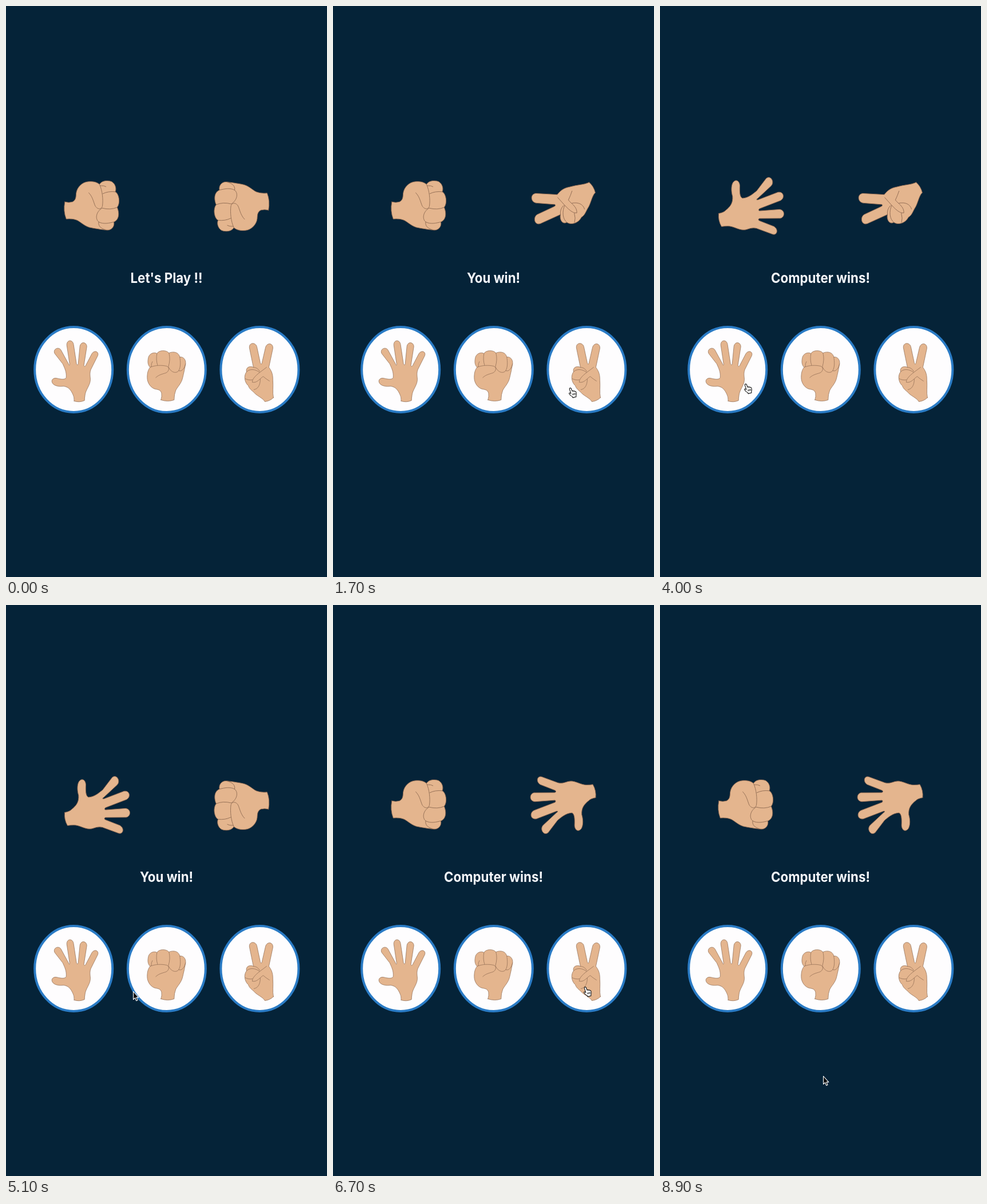
Animation, 561 px wide and 998 px high, one loop 9200 ms. Source, as an HTML page:

```html
<!DOCTYPE html>
<html lang="en">
<head>
<meta charset="utf-8">
<title>Rock paper scissors</title>
<style>
  html, body { margin: 0; width: 100%; height: 100%; overflow: hidden; background: #052338; }
  svg { display: block; }
  .hand { fill: #e4b58e; stroke: #8c6850; stroke-width: .7; stroke-linejoin: round; stroke-linecap: round; }
  .line { fill: none; }
  .ring { fill: #fefdfe; stroke: #2a7bc5; stroke-width: 4; }
  text { font: 700 22.3px Poppins, Inter, sans-serif; fill: #f4f6fa; text-anchor: middle; }
  #cursor path { fill: #fff; stroke: #111; stroke-width: 1.1; stroke-linejoin: round; }
  #cursor #arrow { fill: #0a0a0a; stroke: #fff; }
</style>
</head>
<body>
<svg width="561" height="998" viewBox="0 0 561 998">
  <defs>
    <g id="paper" class="hand">
      <path d="M1 55Q1 47-1 44C-5 35-9 30-18 29C-24 30-32 29-36 25C-41 19-36 14-30 15C-22 17-15 18-13 14C-12 4-16-3-19-10L-33-28C-37-36-26-41-22-34L-9-10C-8-7-7-7-7-10L-12-43C-12-53-1-53 0-43L5-10C5.5-8 8-8 8-10L11-41C13-50 23-48 23-40L18-8C18-5 20-5 21-7L32-28C37-35 45-31 42-24L30 0C27 8 30 14 29 20C28 28 21 36 20 44Q19 50 19 54Q10 58 1 55Z"/>
    </g>
    <g id="rock" class="hand">
      <path d="M-10 53Q-8 47-9 41C-11 35-15 35-20 34C-28 32-34 23-34 14C-34 7-33 1-29-4C-34-9-33-16-32-21C-30-29-21-31-17-28C-14-34-1-35 4-29C8-31 20-33 23-22C30-23 34-16 33-10C32-4 30 6 28 14C26 24 19 30 16 36Q13 43 13 53Q2 57-10 53Z"/>
      <path class="line" d="M-29-4C-20-8-8-8 0-6C6-4 4 4-2 6C-8 8-14 9-19 14M-17-28Q-19-17-16-8M4-29Q7-18 3-5C8 6 17 7 21 2C25-5 24-14 23-22M21 2C27 4 31-2 33-10M-27-5Q-27-11-25-14"/>
    </g>
    <g id="scissors" class="hand">
      <path d="M24 49Q18 55 9 56C6 50-5 46-10 40C-14 36-18 34-20 28C-27 22-28 10-23 4C-25-4-17-7-11-4L-18-38C-19-48-7-48-5-40L1-12C2-8 4-10 4-12L10-38C12-48 24-47 23-37L16-4C22 4 23 10 23 18C24 30 22 40 24 49Z"/>
      <path class="line" d="M12-4L0 5C-9 12-13 17-13 22C-5 24 0 16 6 12Q12 17 17 20M-23 4C-18-2-7-1 0 5M-11-4Q-4-4 0 3M-25 16Q-20 19-13 18M-10 35C-3 34 1 27 1 17"/>
    </g>
  </defs>
  <rect width="561" height="998" fill="#052338"/>
  <use id="left"/>
  <use id="right"/>
  <text id="label" transform="translate(280.5 483.5) scale(1 1.09)"></text>
  <g id="buttons"></g>
  <g id="cursor">
    <path id="arrow" d="M.5.5V14.5L3.6 11.7L5.7 16.8L8 15.8L5.9 10.9H9.8Z"/>
    <g id="pointer">
      <path d="M1.2 2.2C1.6.2 3.8.1 4.5 2L6.1 6.2Q7.3 5 8.4 6.3Q9.8 5.2 10.8 6.8Q12.6 6.2 13 8.4C13.8 11 13.3 13 12.7 14.5L13 16L7.1 17.6L6.4 15.8C3.9 15 2.2 13 .8 10.7C.2 9.4 1.7 8.7 2.8 9.7L3.8 10.4Z"/>
      <path d="M6.8 10.5L7.5 13.2M8.9 10L9.6 12.7M10.9 9.6L11.6 12.2"/>
    </g>
  </g>
</svg>
<script>
const $ = id => document.getElementById(id);
const LOOP = 9200, STEP = 100;
const WIN = "You win!", LOSE = "Computer wins!", TIE = "It's a tie!";

const rounds = [
  [0, "rock", "rock", "Let's Play !!"],
  [900, "rock", "scissors", WIN],
  [1900, "scissors", "scissors", TIE],
  [3500, "paper", "scissors", LOSE],
  [4400, "paper", "rock", WIN],
  [5400, "rock", "paper", LOSE],
  [6800, "scissors", "scissors", TIE],
  [7900, "rock", "paper", LOSE]
];

// time, x, y
const path = [
  [100, 285, 745], [600, 285, 670], [1000, 285, 670], [1600, 412, 667],
  [2300, 412, 667], [2800, 284, 668], [3300, 147, 660], [4700, 147, 660],
  [5100, 222, 675], [5400, 280, 668], [5900, 280, 668], [6600, 438, 667],
  [6900, 438, 667], [7500, 285, 666], [8200, 285, 666], [8900, 285, 823]
];

const buttons = { paper: 118.2, rock: 280.8, scissors: 443.4 };
const BUTTON_Y = 635.5;
for (const [name, x] of Object.entries(buttons))
  $("buttons").innerHTML += `<g transform="translate(${x} ${BUTTON_Y})">
    <ellipse class="ring" rx="68" ry="74.5"/><use href="#${name}"/></g>`;

const tilt = { paper: 80, rock: 85, scissors: 80 };

function showHand(id, name, flip = "") {
  $(id).setAttribute("href", "#" + name);
  $(id).setAttribute("transform",
    `${flip} translate(162 349.8) scale(1 1.09) rotate(${tilt[name]}) scale(1.2) scale(1 .917)`);
}

function cursorAt(t) {
  const i = path.findIndex(p => p[0] >= t);
  if (i < 0) return path.at(-1).slice(1);
  if (i === 0) return path[0].slice(1);
  const [t0, x0, y0] = path[i - 1], [t1, x1, y1] = path[i];
  const u = (t - t0) / (t1 - t0);
  return [x0 + (x1 - x0) * u, y0 + (y1 - y0) * u];
}

const overButton = (x, y) => Object.values(buttons)
  .some(cx => Math.hypot((x - cx) / 66, (y - BUTTON_Y) / 72) < 1);

function draw(now) {
  const t = Math.floor(now % LOOP / STEP) * STEP;
  const [, left, right, text] = rounds.findLast(r => r[0] <= t);
  showHand("left", left);
  showHand("right", right, "rotate(180 280.8 349.6)");
  $("label").textContent = text;

  const [x, y] = cursorAt(t), over = overButton(x, y);
  $("cursor").setAttribute("transform", `translate(${x} ${y})`);
  $("cursor").style.display = t < path[0][0] ? "none" : "";
  $("arrow").style.display = over ? "none" : "";
  $("pointer").style.display = over ? "" : "none";
}

const start = performance.now();
function frame() {
  draw(performance.now() - start);
  requestAnimationFrame(frame);
}
frame();
</script>
</body>
</html>
```
